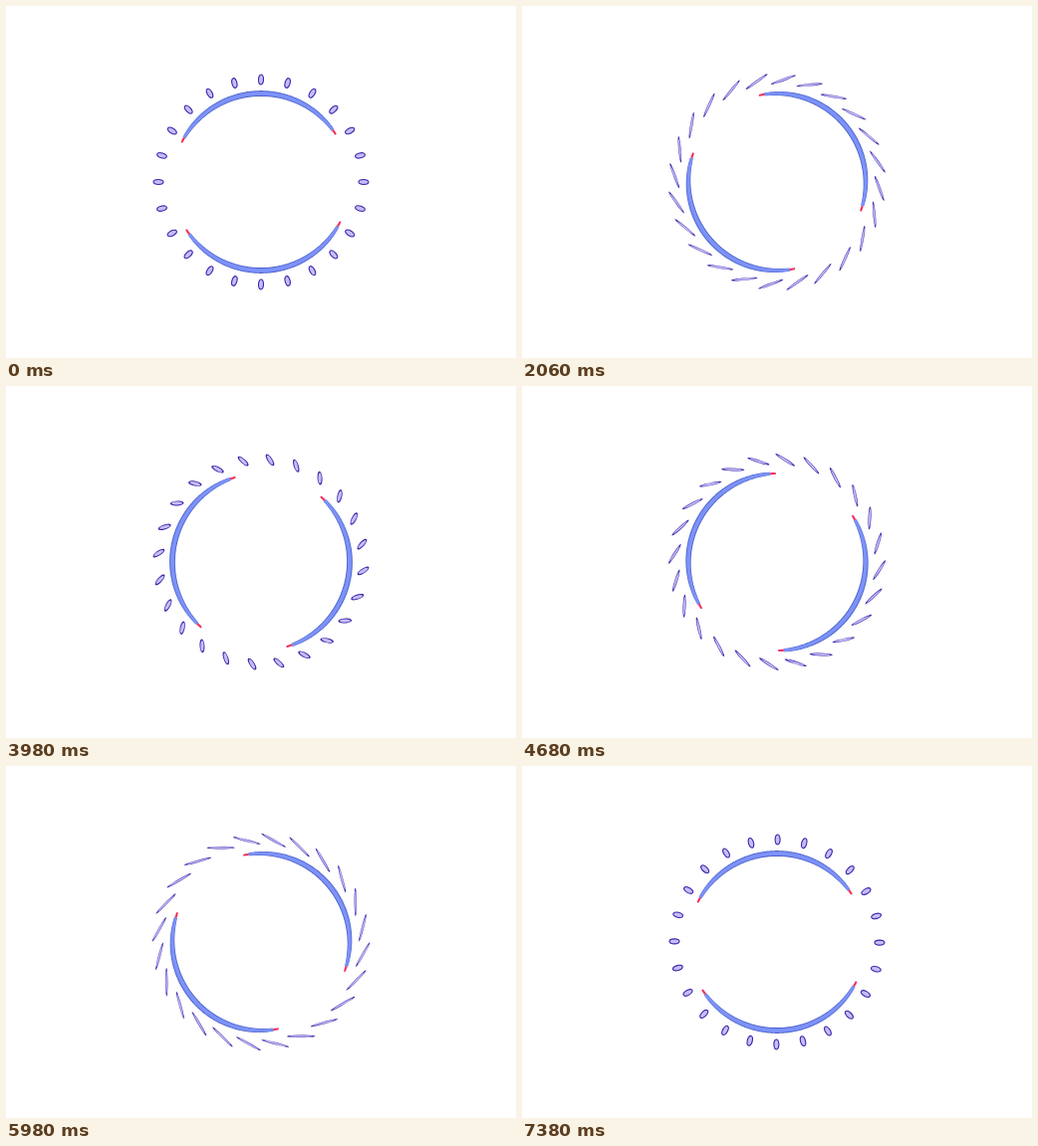
Animation of 512x354 px, one loop 7.4 s. Source, as an HTML page with a canvas:

```html
<!DOCTYPE html>
<html lang="en">
<head>
<meta charset="utf-8">
<title>Sheared ring</title>
<style>
html, body { margin: 0; width: 100%; height: 100%; overflow: hidden; background: #fff; }
canvas { display: block; width: 512px; height: 354px; }
</style>
</head>
<body>
<canvas id="stage" width="512" height="354"></canvas>
<script>
const ctx = document.getElementById('stage').getContext('2d');
const LOOP = 7.4, STEP = 0.02;
const CX = 256, CY = 177;
const BEADS = 24, RING = 103;
const ARC = 89, HALF = 60.5, TIP = 3.5;
const RAD = Math.PI / 180;

// Key poses; angles are degrees clockwise from the top
const poses = [
  { t: 0, arc: -3, ring: 0, shear: 0 },
  { t: 1.32, arc: -23.6, ring: -25, shear: 2.1 },
  { t: 2.82, arc: -241.6, ring: -27, shear: 2.15 },
  { t: 3.98, arc: -257.2, ring: 5, shear: -0.65 },
  { t: 5.28, arc: -212, ring: 25.7, shear: -2.25 },
  { t: 5.98, arc: -131, ring: 22, shear: -2.3 }
];

// Smooth periodic motion through the poses, resting at each extreme
function motion(name) {
  const n = poses.length;
  const time = i => poses[(i + n) % n].t + LOOP * Math.floor(i / n);
  const value = i => poses[(i + n) % n][name];
  const rate = i => (value(i + 1) - value(i)) / (time(i + 1) - time(i));
  const slope = i => {
    const a = rate(i - 1), b = rate(i);
    return a * b > 0 ? 2 * a * b / (a + b) : 0;
  };
  return t => {
    const i = poses.filter(p => p.t <= t).length - 1;
    const h = time(i + 1) - time(i), u = (t - time(i)) / h, w = 1 - u;
    return value(i) * (1 + 2 * u) * w * w + value(i + 1) * u * u * (3 - 2 * u)
      + h * u * w * (slope(i) * w - slope(i + 1) * u);
  };
}

const arcTurn = motion('arc'), ringTurn = motion('ring'), shear = motion('shear');

// The outline is sheared with the bead: thin sides, dark ends
function drawBead(angle, gamma) {
  ctx.save();
  ctx.translate(CX, CY);
  ctx.rotate(angle * RAD);
  ctx.translate(0, -RING);
  ctx.transform(1, 0, -gamma, 1, 0, 0);
  ctx.beginPath();
  ctx.ellipse(0, 0, 2.5, 5, 0, 0, 2 * Math.PI);
  ctx.fillStyle = '#c3bdf8';
  ctx.fill();
  ctx.strokeStyle = '#3a25a8';
  ctx.lineWidth = 1.1;
  ctx.stroke();
  ctx.restore();
}

// Band between two angles, thinning towards the ends of the whole arc
function fillBand(from, to, width, color) {
  const edge = (a, side) => {
    const taper = Math.sqrt(Math.max(0, Math.cos(a / HALF * Math.PI / 2)));
    const r = ARC + side * (0.9 + (width - 0.9) * taper);
    ctx.lineTo(r * Math.sin(a * RAD), -r * Math.cos(a * RAD));
  };
  ctx.beginPath();
  for (let a = from; a <= to; a += 0.5) edge(a, 1);
  for (let a = to; a >= from; a -= 0.5) edge(a, -1);
  ctx.closePath();
  ctx.fillStyle = color;
  ctx.fill();
}

function drawArc(angle) {
  ctx.save();
  ctx.translate(CX, CY);
  ctx.rotate(angle * RAD);
  fillBand(TIP - HALF, HALF - TIP, 2.9, '#4a5fc4');
  fillBand(TIP - HALF, HALF - TIP, 2, '#7c92fa');
  fillBand(-HALF, TIP - HALF, 1.6, '#f0305c');
  fillBand(HALF - TIP, HALF, 1.6, '#f0305c');
  ctx.restore();
}

function draw(seconds) {
  const t = Math.floor(seconds % LOOP / STEP + 1e-6) * STEP;
  ctx.fillStyle = '#fff';
  ctx.fillRect(0, 0, 512, 354);
  const turn = ringTurn(t), gamma = shear(t), arc = arcTurn(t);
  for (let i = 0; i < BEADS; i++) drawBead(turn + i * 360 / BEADS, gamma);
  drawArc(arc);
  drawArc(arc + 180);
}

const start = performance.now();
function tick() {
  draw((performance.now() - start) / 1000);
  requestAnimationFrame(tick);
}
tick();
</script>
</body>
</html>
```
